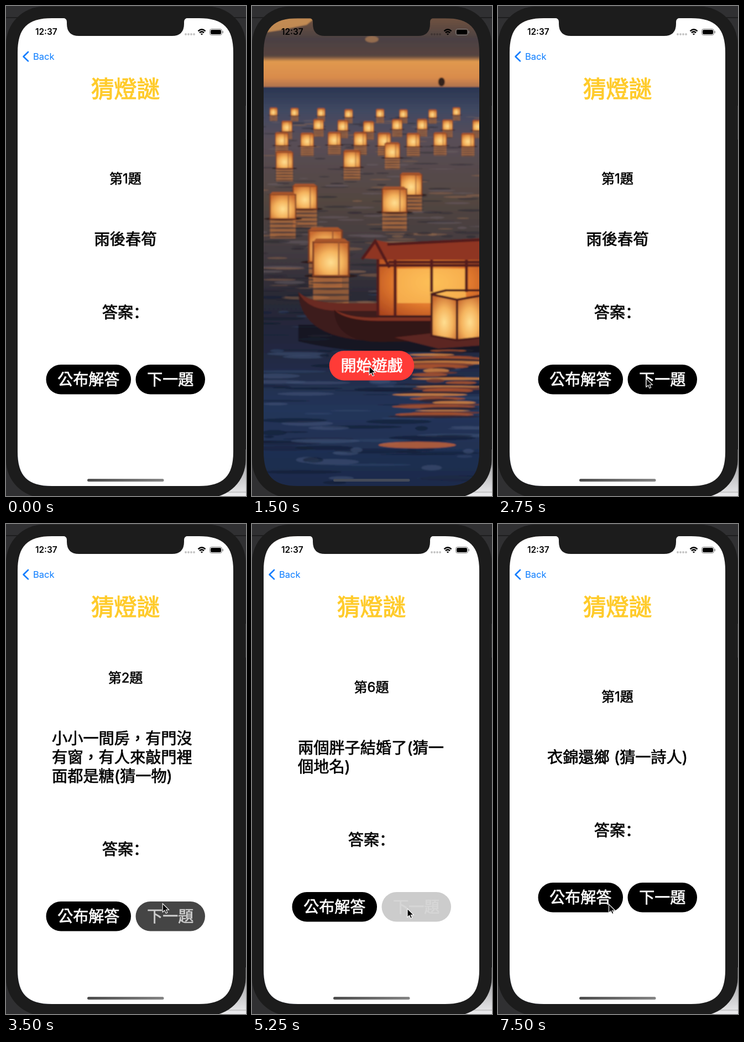
Write an HTML page that moves like this. It is 434 px wide and 884 px high and loops after 8000 ms.

```html
<!DOCTYPE html>
<html lang="zh-Hant">
<head>
<meta charset="utf-8">
<style>
html, body { margin: 0; width: 100%; height: 100%; overflow: hidden; background: #1c1c1c; }
svg { display: block; width: 434px; height: 884px; }
text { font-family: Inter, "Noto Sans CJK TC", "Noto Sans CJK", sans-serif; }
.medium { stroke-width: .026em; }
.colon { font-family: "Noto Sans CJK SC", "Noto Sans CJK", sans-serif; }
</style>
</head>
<body>
<svg viewBox="0 0 434 884">
  <defs>
    <clipPath id="screen">
      <path d="M21 84C21 40 39 22 83 22H349C393 22 411 40 411 84V804C411 848 393 866 349 866H83C39 866 21 848 21 804Z"/>
    </clipPath>
    <filter id="soft" x="0" y="0" width="1" height="1"><feGaussianBlur stdDeviation=".9"/></filter>
    <linearGradient id="sky" x2="0" y2="1">
      <stop offset="0" stop-color="#70523f"/><stop offset=".3" stop-color="#4b4144"/>
      <stop offset=".54" stop-color="#57443f"/><stop offset=".62" stop-color="#e0994f"/>
      <stop offset=".85" stop-color="#d98b4c"/><stop offset="1" stop-color="#a9704f"/>
    </linearGradient>
    <linearGradient id="water" x2="0" y2="1">
      <stop offset="0" stop-color="#2a3652"/><stop offset=".06" stop-color="#414962"/>
      <stop offset=".13" stop-color="#594e57"/><stop offset=".28" stop-color="#534641"/>
      <stop offset=".42" stop-color="#40393f"/><stop offset=".52" stop-color="#2a2935"/>
      <stop offset=".65" stop-color="#202840"/><stop offset=".8" stop-color="#24355a"/>
      <stop offset="1" stop-color="#1b2a4a"/>
    </linearGradient>
    <radialGradient id="glow" cy=".6" r=".65">
      <stop offset="0" stop-color="#ffdf92"/><stop offset=".5" stop-color="#f5b45e"/>
      <stop offset="1" stop-color="#c96c30"/>
    </radialGradient>
    <radialGradient id="house" r=".7">
      <stop offset="0" stop-color="#fbb950"/><stop offset=".5" stop-color="#e27a2e"/>
      <stop offset="1" stop-color="#a53f1c"/>
    </radialGradient>
    <linearGradient id="bar">
      <stop offset="0" stop-color="#4c4c4c"/><stop offset="1" stop-color="#858585"/>
    </linearGradient>
    <linearGradient id="light" x2="0" y2="1">
      <stop offset="0" stop-color="#8c8c8e"/><stop offset="1" stop-color="#ececee"/>
    </linearGradient>
  </defs>

  <rect width="434" height="884" fill="#303032"/>
  <path d="M0 21H434" stroke="#0c0c0c"/>
  <rect x="360" y="800" width="74" height="84" fill="url(#light)"/>
  <path d="M380 877H434" stroke="#aaa"/>
  <rect y="1" width="433.5" height="886" rx="68" fill="#1c1c1c"/>
  <path d="M433.5 180V241" stroke="#3c3c3e"/>

  <g clip-path="url(#screen)">
    <g id="home"></g>
    <rect id="shade" x="21" y="22" width="390" height="844"/>
    <g id="quiz"></g>
    <g id="nav" fill="none" stroke="#0a7cff" stroke-width="2.6">
      <path d="M40 83l-8.5 8.2 8.5 8.2" stroke-linecap="round" stroke-linejoin="round"/>
      <text x="49" y="97" font-size="16.5" fill="#0a7cff" stroke="none">Back</text>
    </g>
    <text id="ghost" x="43" y="108" font-size="19.5" fill="#467bb0" opacity=".85">Back</text>
    <rect id="indicator" x="147" y="853" width="138.5" height="5" rx="2.5"/>
  </g>
  <path d="M103 21.5q7 .5 7 7.5v3q0 22 22 22H300q22 0 22-22v-3q0-7 7-7.5z" fill="#1c1c1c"/>
  <text x="53" y="52.2" font-size="15.4" font-weight="600">12:37</text>
  <path d="M325 51h16" stroke="#000" stroke-opacity=".24" stroke-width="3.8" stroke-linecap="round" stroke-dasharray="0 5"/>
  <g fill="none" stroke="#000" stroke-width="2.5">
    <path d="M347.5 45.3q6.500-6 13 0M350 48.2q4-3.600 8 0"/>
    <path d="M351.8 50.3q2.200-1.800 4.400 0L354 52.6z" fill="#000" stroke="none"/>
    <rect x="368.5" y="41.5" width="22" height="11" rx="3.2" stroke="#777" stroke-width="1"/>
    <rect x="370" y="43" width="19" height="8" rx="2" fill="#000" stroke="none"/>
    <path d="M392.3 45v4" stroke="#777" stroke-width="1.2"/>
  </g>
  <path id="cursor" d="M0 0V15.5l3.6-3.3 2.4 5.3 2.6-1.1-2.3-5.1h5z" stroke="#fff" stroke-width="1.1"/>
</svg>
<script>
const el = id => document.getElementById(id);
const set = (id, name, value) => el(id).setAttribute(name, value);
const rect = (x, y, w, h, fill, more = '') =>
  `<rect x="${x}" y="${y}" width="${w}" height="${h}" fill="${fill}" ${more}/>`;
const path = (d, fill, more = '') => `<path d="${d}" fill="${fill}" ${more}/>`;
const oval = (x, y, rx, ry, fill, o = 1) =>
  `<ellipse cx="${x}" cy="${y}" rx="${rx}" ry="${ry}" fill="${fill}" opacity="${o}"/>`;
// y is the middle of the glyphs
const text = (s, x, y, size, fill = '#000', more = 'class="medium"') =>
  `<text x="${x}" y="${y + size * .38}" font-size="${size}" fill="${fill}" stroke="${fill}" ${more}>${s}</text>`;
const middle = 'class="medium" text-anchor="middle"';
const pill = (s, x, y, w, fill, o = 1) =>
  rect(x, y - 26.5, w, 53.5, fill, `rx="26.7" opacity="${o}"`) +
  text(s, x + w / 2, y, 28, '#fff', `${middle} opacity="${o}"`);

let seed = 7;
const rnd = () => (seed = seed * 16807 % 2147483647) / 2147483647;
const repeat = (n, make) => Array.from({ length: n }, (_, i) => make(i));

const waves = (n, top, bottom, colors) => repeat(n, () => {
  const y = top + rnd() * (bottom - top), k = (y - 130) / 730;
  return oval(rnd() * 420, y, 8 + k * 80 * rnd(), .8 + 5 * k * rnd(),
    colors[Math.floor(rnd() * colors.length)], .5);
}).join('');

function lantern([x, y]) {
  const w = 14 + (y - 200) * .175, h = w * .95, l = x - w / 2;
  return rect(l, y, w, h * .8, '#d07a3c', 'opacity=".6"') +
    repeat(4, i => oval(x, y + h * (.2 + i * .18), w * .6, w * .035, '#3a3034', .7)).join('') +
    oval(x, y, w * .75, w * .06, '#2c1a1c') +
    rect(l, y - h, w, h, 'url(#glow)', `stroke="#7a3a24" stroke-width="${w / 20}"`) +
    path(`M${x + w * .22} ${y - h}V${y}`, 'none', `stroke="#9a5430" stroke-width="${w / 26}"`) +
    path(`M${l} ${y - h}l${w * .08} ${-w * .1}h${w * .8}l${w * .12} ${w * .1}z`, '#a8542c');
}

function lanterns() {
  const far = repeat(24, i => [20 + i * 16 + rnd() * 12, 196 + i * 2 % 3 * 26 + rnd() * 6]);
  const near = [[50, 293], [172, 291], [245, 274], [279, 341], [87, 366], [249, 372], [47, 384], [124, 462], [134, 487]];
  return [...far, ...near].sort((a, b) => a[1] - b[1]).map(lantern).join('');
}

function boat() {
  const beam = 'stroke="#521b1a" stroke-width="5"';
  return path('M75 516q18 18 70 20l280 2v58l-190 8q-156 4-160-88z', '#3d1a1b') +
    path('M75 516q18 18 70 20h75v14H150q-60 0-75-34z', '#6a2a20') +
    path('M140 548q30 16 80 14h200v40l-190 4q-88 2-90-58z', '#301315') +
    path('M140 548q30 16 80 14h110v6H220q-60 0-80-20z', '#7e3022') +
    rect(217, 440, 200, 118, 'url(#house)') +
    rect(254, 474, 124, 62, '#ffc35c', 'opacity=".7"') +
    path('M219 440V558M250 450V560M316 440V516M379 430V516M217 468H420', 'none', beam) +
    path('M190 455l24-33 30 6 176-10v40H238z', '#8f3620') +
    path('M190 457l24-33 26 48M236 430l184-9M238 462h182', 'none', beam) +
    path('M248 598l70-8 90 8v14l-80 6z', '#5b2720') +
    path('M316 522l46 8v73l-46-9z', 'url(#glow)') +
    path('M362 530l46-8v76l-46 5z', 'url(#glow)') +
    path('M316 521v74l46 8 46-5M362 530v73M314 520l48 10 46-8M314 520l28-7h66', 'none',
      'stroke="#4b1c1a" stroke-width="4"');
}

const reflections = () =>
  path('M75 575h340v50H250q-90 0-175-20z', '#15121b', 'opacity=".75"') +
  repeat(34, i => oval(310 + rnd() * 60, 622 + i * 3.6, 15 + rnd() * 70, 1.5 + rnd() * 3,
    ['#b3562c', '#2b2230', '#e28a42', '#7c3d2c'][i % 4], .8)).join('') +
  oval(290, 792, 70, 6, '#c0623a', .85);

el('home').innerHTML = '<g filter="url(#soft)">' +
  rect(0, 22, 430, 126, 'url(#sky)') +
  path('M0 22H105L90 34 40 44 0 50z', '#d99a58', 'opacity=".8"') +
  oval(208, 60, 12, 6, '#c58a58', .6) +
  rect(0, 146, 430, 730, 'url(#water)') +
  oval(334, 137, 6, 8, '#33211f') +
  waves(280, 200, 540, ['#25242e', '#2f2b34', '#6b5f66', '#94694c']) +
  waves(130, 520, 866, ['#0f182c', '#142039', '#33486e', '#46587c']) +
  lanterns() + reflections() + boat() + '</g><g id="start">' +
  pill('開始遊戲', 131, 648.5, 153.5, '#ff3b37') + '</g>';

// start ms, number, riddle lines
const riddles = [
  [0, 1, '雨後春筍'],
  [3250, 2, '小小一間房，有門沒', '有窗，有人來敲門裡', '面都是糖(猜一物)'],
  [4000, 3, '男人上廁所小便(猜一', '位台灣男歌星)'],
  [4500, 4, '一加一(猜一字)'],
  [5000, 5, '千里相逢'],
  [5250, 6, '兩個胖子結婚了(猜一', '個地名)'],
  [5500, 7, '十五天(猜一字)'],
  [5750, 8, '守株待兔'],
  [6250, 9, '狗咬鴨子'],
  [7000, 1, '衣錦還鄉 (猜一詩人)']];

function quiz(t) {
  const [start, num, ...lines] = riddles.findLast(r => r[0] <= t);
  const grow = 17 * (lines.length - 1);
  const dim = num > 1 ? [.2, .73][(t - start) / 250] ?? 1 : 1;
  const [x, align] = grow ? [83, 'class="medium"'] : [216, middle];
  return rect(21, 22, 390, 844, '#fff') +
    text('猜燈謎', 216, 149, 41.5, '#ffcb2b', middle) +
    text(`第${num}題`, 216, 311 - grow, 24, '#000', middle) +
    lines.map((s, i) => text(s, x, 420 - grow + 34 * i, 28.2, '#000', align)).join('') +
    text('答案<tspan class="colon" lang="zh-Hans">：</tspan>', 216, 552 + grow, 28.2, '#000', middle) +
    pill('公布解答', 72.5, 673.5 + grow, 153.5, '#000') +
    pill('下一題', 234.5, 673.5 + grow, 125.5, '#000', dim);
}

// how much of the quiz page has slid away: it leaves, then comes back
const settle = ms => {
  const p = ms < 0 ? 0 : 1 - Math.exp(-ms / 146);
  return p > .96 ? 1 : p;
};
const away = t => t < 4000 ? settle(t - 620) - settle(t - 1500) : settle(t - 6370) - settle(t - 7000);

// ms, x, y
const pointer = [[0, -60, 200], [500, 55, 92], [1000, 109.5, 364.5], [1500, 212, 650], [1750, 237, 664.5],
  [2750, 268, 672], [4250, 298.5, 697.5], [6250, 263.5, 690.5], [6500, 52, 95], [7000, 207, 650], [7500, 200.5, 686]];

function pointerAt(t) {
  const i = pointer.findLastIndex(k => k[0] <= t), a = pointer[i], b = pointer[i + 1] ?? a;
  const p = (t - a[0]) / (b[0] - a[0] || 1);
  return [1, 2].map(c => a[c] + (b[c] - a[c]) * Math.min(1, p));
}

let shown = -1;
const begin = performance.now();
function draw(now) {
  const t = Math.min(7500, Math.floor(Math.max(0, now - begin) % 8000 / 250) * 250);
  if (t !== shown) {
    shown = t;
    const gone = away(t), covered = 1 - gone, entering = gone > 0 && gone < .3;
    el('quiz').innerHTML = quiz(t);
    set('quiz', 'transform', `translate(${390 * gone})`);
    set('home', 'transform', `translate(${8.7 - 117 * covered})`);
    set('start', 'opacity', entering ? .73 : 1);
    set('shade', 'opacity', .12 * covered);
    set('nav', 'opacity', gone ? 0 : 1);
    set('ghost', 'visibility', entering ? 'visible' : 'hidden');
    set('indicator', 'fill', gone > .5 ? '#444a58' : 'url(#bar)');
    set('cursor', 'transform', `translate(${pointerAt(t)})`);
  }
  requestAnimationFrame(draw);
}
draw(begin);
</script>
</body>
</html>
```
